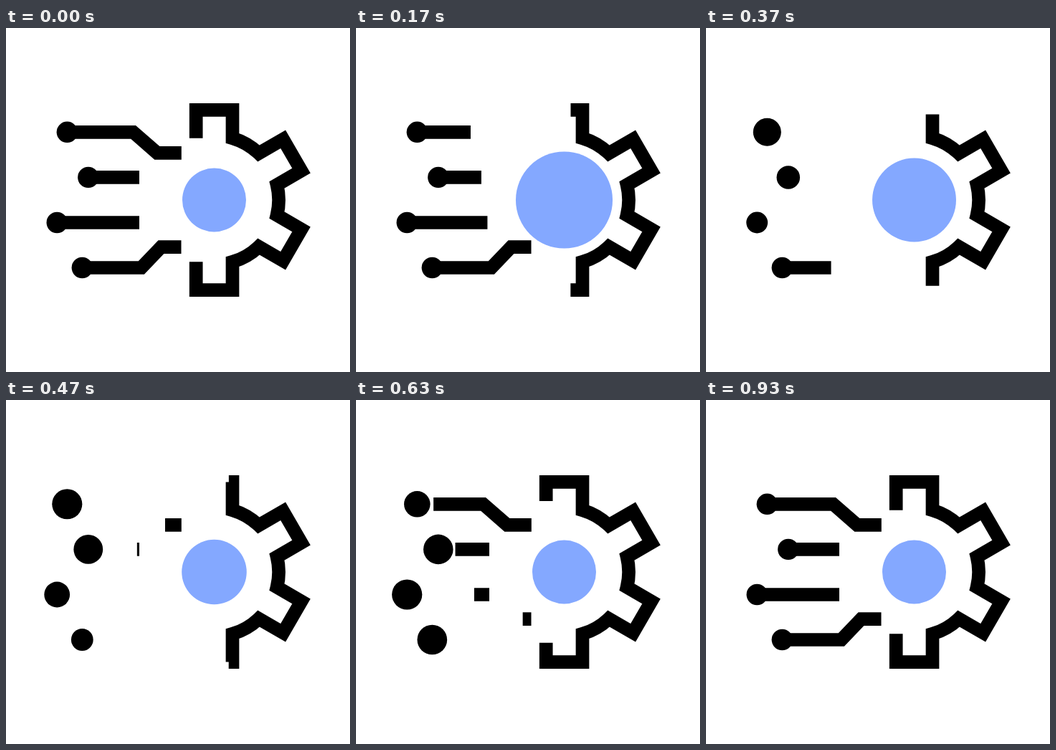
An HTML page that plays this animation: 480x480 px, repeating every 1130 ms.

```html
<!DOCTYPE html>
<html lang="en">
<head>
<meta charset="utf-8">
<title>Gear and circuit</title>
<style>
html, body { margin: 0; width: 100%; height: 100%; overflow: hidden; background: #fff; }
svg { display: block; width: 100%; height: 100%; }
path { fill: none; stroke: #000; stroke-width: 18.7; stroke-miterlimit: 10; }
</style>
</head>
<body>
<svg id="stage" viewBox="0 0 480 480"></svg>
<script>
const LOOP = 1130, LAST = 28, REST = 34;
const CX = 290.6, CY = 240;
const stage = document.getElementById('stage');

function add(tag, attrs) {
  const el = document.createElementNS('http://www.w3.org/2000/svg', tag);
  for (const key in attrs) el.setAttribute(key, attrs[key]);
  return stage.appendChild(el);
}

// Ease equal to cubic-bezier(2/3, 0, 1/3, 1), from start over dur frames
function ease(frame, start, dur) {
  const u = Math.min(1, Math.max(0, (frame - start) / dur));
  let lo = 0, hi = 1;
  for (let i = 0; i < 30; i++) {
    const s = (lo + hi) / 2;
    if (2 * s - 3 * s * s + 2 * s * s * s < u) lo = s; else hi = s;
  }
  return u === 0 || u === 1 ? u : lo * lo * (3 - 2 * lo);
}

// Four teeth, 60 degrees apart, joined by arcs of the rim
function gearPath() {
  const rim = 90, half = 25.4, tip = 125.6;
  const root = Math.sqrt(rim * rim - half * half);
  let d = '';
  for (let i = 0; i < 4; i++) {
    const c = Math.cos(i * Math.PI / 3), s = Math.sin(i * Math.PI / 3);
    const at = (x, y) => `${(CX + x * c - y * s).toFixed(3)} ${(CY + x * s + y * c).toFixed(3)}`;
    d += i ? `A${rim} ${rim} 0 0 1 ` : 'M';
    d += `${at(-half, -root)}L${at(-half, -tip)}L${at(half, -tip)}L${at(half, -root)}`;
  }
  return d;
}

const core = add('circle', { cx: 290.5, cy: CY, fill: '#84a8ff' });
const gear = add('path', { d: gearPath() });
const gearLen = gear.getTotalLength();

// out / back: frames at which a wire retracts and regrows; pulse: its dot swells
const wires = [
  { x: 85.3, y: 145.3, d: 'H177.5L210.8 174.4H244.8', out: 0, back: 9.35, pulse: 5 },
  { x: 114.8, y: 208.4, d: 'H186', out: 1.7, back: 11, pulse: 7 },
  { x: 71.2, y: 271.5, d: 'H186', out: 3.5, back: 13.8, pulse: 9 },
  { x: 106.3, y: 334.5, d: 'H188.9L216.5 305.6H244.5', out: 6.05, back: 15.2, pulse: 11 }
];
for (const w of wires) {
  w.line = add('path', { d: `M${w.x} ${w.y}${w.d}` });
  w.len = w.line.getTotalLength();
  w.dot = add('circle', { cx: w.x, cy: w.y });
}

// Shows only the part of a path between two lengths
function trim(path, from, to, len) {
  if (to - from < 0.05) {
    path.setAttribute('visibility', 'hidden');
    return;
  }
  path.setAttribute('visibility', 'visible');
  if (from < 0.05 && len - to < 0.05) path.removeAttribute('stroke-dasharray');
  else path.setAttribute('stroke-dasharray', `0 ${from} ${to - from} ${len * 2}`);
}

function draw(f) {
  const swell = ease(f, 0, 5.5) - ease(f, 7, 8.6);
  core.setAttribute('r', 44.5 + 23.2 * swell);

  const cut = 0.15 * gearLen * (ease(f, 0, 8.3) - ease(f, 9.65, 13.8));
  trim(gear, cut, gearLen - cut, gearLen);

  for (const w of wires) {
    const grown = ease(f, w.back, 14.3);
    if (f < w.back + 2) trim(w.line, 0, w.len * (1 - ease(f, w.out, 9.6)), w.len);
    else trim(w.line, w.len * (1 - grown), w.len, w.len);
    const pulse = ease(f, w.pulse, 10) - ease(f, w.pulse + 10.3, 7.7);
    w.dot.setAttribute('r', 14.7 + 6.4 * pulse);
  }
}

// 30 pictures a second, with step times rounded to 10 ms
function tick() {
  const t = performance.now() % LOOP;
  const frame = Math.floor((Math.floor(t / 10) + 0.5) * 0.3);
  draw(frame >= LAST ? REST : frame);
  requestAnimationFrame(tick);
}
tick();
</script>
</body>
</html>
```
